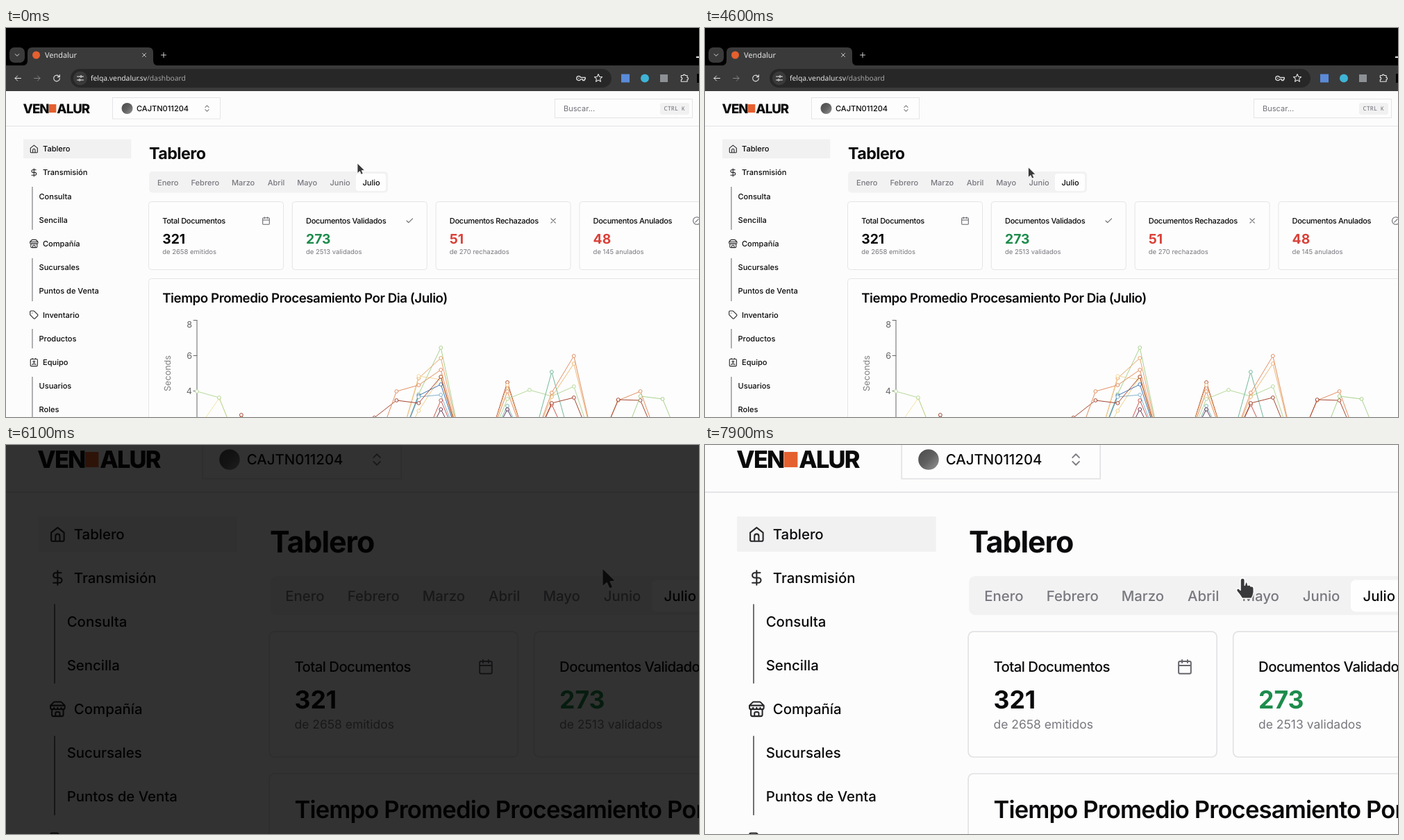
An HTML page for the animation above (8000 ms loop, 998x561 px).

```html
<!DOCTYPE html>
<html lang="es">
<head>
<meta charset="utf-8">
<title>Tablero</title>
<style>
html, body { margin: 0; width: 100%; height: 100%; overflow: hidden; background: #000; }
svg { display: block; width: 100vw; height: 100vh; }
text { font-family: Inter, sans-serif; font-size: 11.06px; fill: #18181b; white-space: pre; text-rendering: geometricPrecision; }
.ui { font-family: "Noto Sans", "Open Sans", sans-serif; fill: #e6e6e6; }
.mono { font-family: "Noto Sans Mono", monospace; }
</style>
</head>
<body>
<svg viewBox="0 0 998 561" preserveAspectRatio="none">
  <defs>
    <linearGradient id="avatar" x1="0" y1="0" x2="1" y2="1">
      <stop offset="0" stop-color="#4a4a4a"/>
      <stop offset=".5" stop-color="#606060"/>
      <stop offset="1" stop-color="#969696"/>
    </linearGradient>
  </defs>
  <g id="scene">
    <g id="page"></g>
    <g id="chrome"></g>
    <g id="cursor" stroke="#fff" stroke-width=".8" fill="#39393b" stroke-linejoin="round">
      <path id="arrow" d="M0 0V14.6L3.5 11.6 5.5 16.2 8.2 15 6.2 10.6 10.4 10.2Z"/>
      <path id="hand" d="M-1.7 1Q-1.5-.4 0-.4T1.7 1V5.2Q3 0 4.2 5.2 5.6 4.2 6.4 6 8.4 5.6 8.7 7.6V10.6Q8.5 13 7 15.4H-.4Q-2 12.6-4.4 9.8-5.2 8.2-3.6 7.6-2.4 7.8-1.7 9Z"/>
    </g>
  </g>
  <rect id="shade" width="998" height="561" fill="#000" opacity="0"/>
</svg>
<script>
const $ = id => document.getElementById(id);
const rect = (x, y, w, h, fill, more = '') =>
  `<rect x="${x}" y="${y}" width="${w}" height="${h}" fill="${fill}" ${more}/>`;
const box = (x, y, w, h, r) => rect(x, y, w, h, '#fdfdfd', `rx="${r}" stroke="#e2e2e5" stroke-width=".9"`);
const text = (x, y, s, more = '') => `<text x="${x}" y="${y}" ${more}>${s}</text>`;
const dot = (x, y, r, fill, more = '') => `<circle cx="${x}" cy="${y}" r="${r}" fill="${fill}" ${more}/>`;
const stroke = (d, color, w = 1) =>
  `<path d="${d}" fill="none" stroke="${color}" stroke-width="${w}" stroke-linecap="round" stroke-linejoin="round"/>`;
// Icons are drawn on a 24 unit grid around their centre.
const icon = (x, y, d, size, color) =>
  `<g transform="translate(${x} ${y}) scale(${size / 24}) translate(-12 -12)">${stroke(d, color, 2)}</g>`;
const style = (size, weight, fill = '#0a0a0c', gap = 0) =>
  `style="font-size:${size}px;font-weight:${weight};fill:${fill};letter-spacing:${gap}em"`;

const ICONS = {
  home: 'M3 10 12 3l9 7v10a2 2 0 0 1-2 2H5a2 2 0 0 1-2-2zM9 21v-6a3 3 0 0 1 6 0v6',
  dollar: 'M12 2v20M17 5H9.5a3.5 3.5 0 0 0 0 7h5a3.5 3.5 0 0 1 0 7H6',
  store: 'M2 7 6.4 2.6A2 2 0 0 1 7.8 2h8.4a2 2 0 0 1 1.4.6L22 7M4 12v8a2 2 0 0 0 2 2h12a2 2 0 0 0 2-2v-8M15 22v-4a2 2 0 0 0-2-2h-2a2 2 0 0 0-2 2v4M2 7h20v3a2.5 2.5 0 0 1-5 0 2.5 2.5 0 0 1-5 0 2.5 2.5 0 0 1-5 0 2.5 2.5 0 0 1-5 0z',
  tag: 'M12.6 2.6A2 2 0 0 0 11.2 2H4a2 2 0 0 0-2 2v7.2a2 2 0 0 0 .6 1.4l8.7 8.7a2.4 2.4 0 0 0 3.4 0l6.6-6.6a2.4 2.4 0 0 0 0-3.4zM7.5 7.5h.01',
  badge: 'M5 4h14a2 2 0 0 1 2 2v14a2 2 0 0 1-2 2H5a2 2 0 0 1-2-2V6a2 2 0 0 1 2-2zM8 2v2M16 2v2M7 18q5-3.5 10 0M12 8.5a2.2 2.2 0 0 1 0 4.4 2.2 2.2 0 0 1 0-4.4',
  calendar: 'M5 4h14a2 2 0 0 1 2 2v14a2 2 0 0 1-2 2H5a2 2 0 0 1-2-2V6a2 2 0 0 1 2-2zM16 2v4M8 2v4M3 10h18',
  check: 'M20 6 9 17l-5-5',
  cross: 'M18 6 6 18M6 6l12 12',
  slash: 'M12 2a10 10 0 0 1 0 20 10 10 0 0 1 0-20M8 16l8-8',
  sort: 'M7 15l5 5 5-5M7 9l5-5 5 5',
  down: 'M6 9l6 6 6-6',
  plus: 'M12 4v16M4 12h16',
  back: 'M21 12H4M11 5l-7 7 7 7',
  next: 'M3 12h17M13 5l7 7-7 7',
  reload: 'M20 12a8 8 0 1 1-2.5-5.8L20 8.5M20 3v5.5h-5.5',
  tune: 'M3 7h8M17 7h4M3 17h4M13 17h8M14 4.5a2.5 2.5 0 0 1 0 5 2.5 2.5 0 0 1 0-5M10 14.5a2.5 2.5 0 0 1 0 5 2.5 2.5 0 0 1 0-5',
  key: 'M7 7a5 5 0 0 1 4.6 3H22v4h-2v3h-4v-3h-4.4A5 5 0 1 1 7 7M7 11.5v1',
  star: 'M12 2l3 6.8 7.3.7-5.5 4.9 1.6 7.2L12 17.8l-6.4 3.8 1.6-7.2L1.7 9.5 9 8.8z',
  puzzle: 'M4 6h5a2.5 2.5 0 0 1 5 0h5v5a2.5 2.5 0 0 1 0 5v5H4v-5a2.5 2.5 0 0 0 0-5z'
};

function chrome() {
  const light = '#e6e6e6', bar = '#3a3a3a';
  const put = (x, y, name, size, color = light) => icon(x, y, ICONS[name], size, color);
  return rect(0, 0, 998, 55, '#000') + rect(0, 54, 998, 37, bar) +
    rect(5, 28, 22, 22, bar, 'rx="7"') + put(16, 39, 'down', 11) +
    `<path d="M24 54.5Q31 54 31 47V35Q31 28 38 28H205Q212 28 212 35V47Q212 54 219 54.5Z" fill="${bar}"/>` +
    dot(43.5, 39, 5.5, '#e5602f') +
    text(56, 43, 'Vendalur', 'class="ui" style="font-size:10.9px"') +
    put(199, 39, 'cross', 10) + put(227, 39, 'plus', 10.5) +
    rect(994, 41, 4, 2, light) +
    put(17, 72.5, 'back', 12) + put(45, 72.5, 'next', 12, '#858585') + put(73, 72.5, 'reload', 13) +
    rect(93, 59, 779, 27, '#272727', 'rx="13.5"') +
    dot(107, 72.5, 10, bar) + put(107, 72.5, 'tune', 12) +
    text(122, 76.2, 'felqa.vendalur.sv<tspan fill="#a4a4a4">/dashboard</tspan>', 'class="ui" style="font-size:10.3px"') +
    put(828, 72.5, 'key', 15) + put(853, 72, 'star', 13) +
    rect(886, 66.5, 12, 12, '#5b8bd8') + dot(920, 72.5, 6, '#3fb4d6') + rect(942, 67, 11, 11, '#8d9196') +
    put(977, 72, 'puzzle', 14) + rect(995, 66, 3, 13, '#000');
}

function header() {
  return rect(0, 141, 998, 1, '#e4e4e7') +
    text(24.5, 122.6, 'VEN', style(18.6, 800, '#0a0a0a', -.05)) +
    rect(61.8, 110, 10.5, 12, '#e5602f') +
    text(73.3, 122.6, 'ALUR', style(18.6, 800, '#0a0a0a', -.05)) +
    box(153.5, 100.5, 155, 30.5, 0) + dot(174.5, 116, 8, 'url(#avatar)') +
    text(188, 120, 'CAJTN011204', style(11.06, 500)) + icon(289.5, 116, ICONS.sort, 12.6, '#7d7d82') +
    box(790.5, 102.5, 198, 27, 0) + text(803, 120, 'Buscar...', style(11.06, 400, '#717179')) +
    rect(942, 108, 42, 17, '#f1f1f2', 'rx="3"') +
    text(947.5, 119.3, 'CTRL', 'class="mono" style="font-size:8.6px;fill:#717179"') +
    text(973, 119, 'K', 'class="mono" style="font-size:8px;fill:#717179"');
}

function sidebar() {
  const items = [['Tablero', 'home'], ['Transmisión', 'dollar'], ['Consulta'], ['Sencilla'],
    ['Compañía', 'store'], ['Sucursales'], ['Puntos de Venta'], ['Inventario', 'tag'],
    ['Productos'], ['Equipo', 'badge'], ['Usuarios'], ['Roles']];
  const rows = items.map(([name, mark], i) => {
    const y = 174.2 + i * 34.2;
    return text(mark ? 53 : 47.5, y + 4, name, style(11.06, 500)) +
      (mark ? icon(40.3, y, ICONS[mark], 13.4, '#27272a') : '');
  });
  const rails = [[229, 291], [332, 394], [434, 462], [503, 570]]
    .map(([a, b]) => rect(37.5, a, .9, b - a, '#55555a'));
  return rect(25, 160.5, 155.3, 27.5, '#f1f1f2') + rails.join('') + rows.join('');
}

function tabs() {
  const months = { Enero: 218, Febrero: 266.5, Marzo: 325, Abril: 376.7, Mayo: 419.2, Junio: 466.5, Julio: 513.5 };
  return text(206, 188.6, 'Tablero', style(23.3, 700, '#0a0a0c', -.025)) +
    rect(206, 207, 344, 30.5, '#f2f2f3', 'rx="5"') + rect(504, 210, 43, 25, '#fefefe', 'rx="4"') +
    Object.entries(months).map(([m, x]) =>
      text(x, 226.6, m, style(11.06, 500, m === 'Julio' ? '#0a0a0c' : '#78787f'))).join('');
}

function cards() {
  return [
    ['Total Documentos', 321, 'de 2658 emitidos', '#0a0a0c', 'calendar'],
    ['Documentos Validados', 273, 'de 2513 validados', '#1d8c4c', 'check'],
    ['Documentos Rechazados', 51, 'de 270 rechazados', '#da4038', 'cross'],
    ['Documentos Anulados', 48, 'de 145 anulados', '#da4038', 'slash']
  ].map(([name, count, note, color, mark], i) => {
    const x = 205.5 + i * 206.8;
    return box(x, 250.5, 194, 98, 4) + text(x + 19.7, 281.8, name, style(11.06, 500, '#0a0a0c', -.028)) +
      text(x + 19.7, 310.5, count, style(19.3, 700, color)) +
      text(x + 19.7, 326.2, note, style(9.48, 400, '#77777e')) +
      icon(x + 169, 278, ICONS[mark], 12.8, '#66666d');
  }).join('');
}

// Each run: colour, first day, heights; it falls to the floor on either side.
const RUNS = [
  ['#f4e4a6', 0, 580, 534], ['#b5d99a', 0, 524, 533], ['#a5462f', 2, 558],
  ['#a9d18e', 10, 528, 461], ['#e9a56c', 10, 505, 476], ['#f3d79a', 10, 502, 507],
  ['#efcf86', 10, 552, 503], ['#3f76b3', 10, 530, 514], ['#86b3cc', 10, 532, 529],
  ['#c8574c', 11, 537], ['#6a3350', 11, 550],
  ['#a5462f', 8, 562, 537, 541, 503], ['#e28f62', 9, 524, 515, 493],
  ['#b5522f', 14, 511], ['#f0b878', 14, 515], ['#e28f62', 14, 524],
  ['#7db8b0', 14, 545], ['#5a3358', 14, 550], ['#b5d99a', 14, 535, 522, 531, 517],
  ['#72b89a', 16, 496], ['#f0b878', 16, 532, 484], ['#e28f62', 16, 526, 473],
  ['#c8574c', 16, 543], ['#a5462f', 16, 541, 533],
  ['#e28f62', 19, 537, 524], ['#a5462f', 19, 536, 537], ['#a9d18e', 20, 531, 535]
];

function chart() {
  const floor = 612, dayX = d => 275 + d * 31.93;
  const runs = RUNS.map(([color, day, ...ys]) => {
    const pts = ys.map((y, i) => [dayX(day + i), y]);
    const path = [...(day ? [[dayX(day - 1), floor]] : []), ...pts, [dayX(day + ys.length), floor]];
    return stroke('M' + path.join('L'), color) +
      pts.map(([x, y]) => dot(x, y, 2.4, '#fff', `stroke="${color}"`)).join('');
  });
  const ticks = [[8, 421.5, 431.7], [6, 472.5, 477], [4, 523.5, 528]].map(([n, y, base]) =>
    stroke(`M270 ${y}H275`, '#666') + text(268, base, n, 'text-anchor="end" ' + style(12.6, 400, '#666')));
  return box(205.5, 361.5, 820, 260, 4) +
    text(225.2, 396.2, 'Tiempo Promedio Procesamiento Por Dia (Julio)', style(18.75, 600, '#0a0a0c', -.025)) +
    stroke('M275 421.5V570', '#666') + ticks.join('') +
    text(0, 0, 'Seconds', 'text-anchor="middle" transform="translate(236.5 498) rotate(-90)" ' + style(12.6, 400, '#808080')) +
    runs.join('');
}

$('page').innerHTML = rect(0, 91, 998, 520, '#fcfcfc') + header() + sidebar() + tabs() + cards() + chart();
$('chrome').innerHTML = chrome();

const LOOP = 8000, STEP = 100, ZOOM_AT = 6050, HAND_AT = 7700;
// time, x, y of the pointer tip in page units
const POINTER = [[0, 506, 195], [3700, 496, 197], [3800, 477, 199.5], [3900, 465.5, 200.8],
  [7600, 453, 203], [7700, 427.5, 207.5], [7800, 421.7, 208.6], [7900, 419.6, 209.1]];
const clamp = v => Math.max(0, Math.min(1, v));

function draw() {
  const t = Math.floor(performance.now() % LOOP / STEP) * STEP;
  const zoomed = t >= ZOOM_AT;
  $('scene').setAttribute('transform', zoomed ? 'translate(0 -193) scale(1.845)' : '');
  const [, x, y] = POINTER.findLast(p => p[0] <= t);
  $('cursor').setAttribute('transform', `translate(${x} ${y})`);
  $('arrow').style.display = t < HAND_AT ? '' : 'none';
  $('hand').style.display = t < HAND_AT ? 'none' : '';
  // the light falls and returns by 0.29 per step
  const out = Math.min(t, 5900);
  const light = zoomed ? .49 + (t - 6200) * .0029 : .65 - (out - 5700) * .0029;
  $('shade').setAttribute('opacity', 1 - clamp(light));
  requestAnimationFrame(draw);
}
draw();
</script>
</body>
</html>
```
